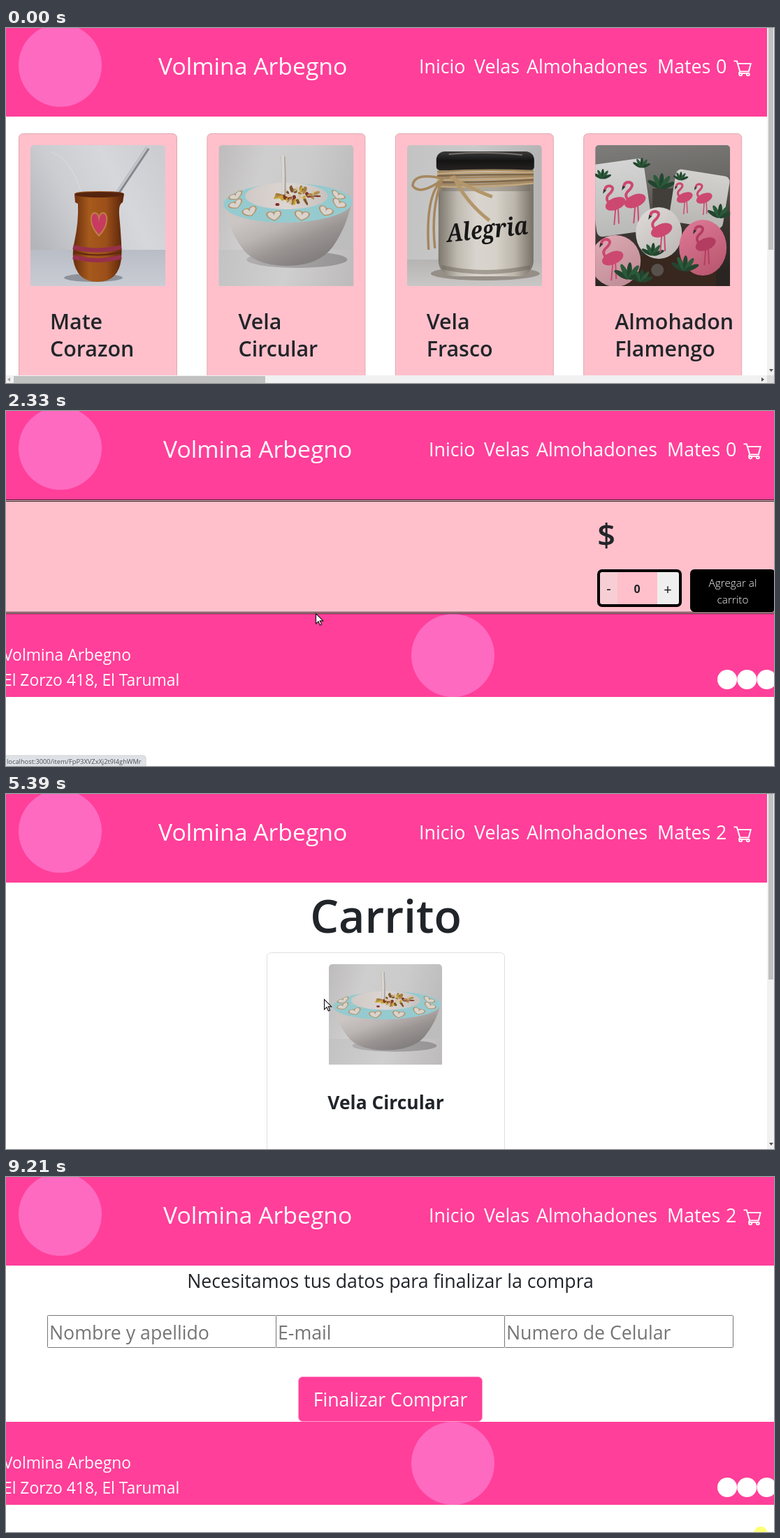
Recreate the animation shown at these times as an HTML page with a canvas. Size 1099 by 509 pixels, loop 9350 ms.

```html
<!DOCTYPE html>
<html lang="es">
<head>
<meta charset="utf-8">
<title>Tienda</title>
<style>
html, body { margin: 0; width: 100%; height: 100%; overflow: hidden; background: #fff; }
canvas { display: block; width: 100vw; height: 100vh; }
</style>
</head>
<body>
<canvas id="stage" width="1099" height="509"></canvas>
<script>
const ctx = document.getElementById('stage').getContext('2d');
const LOOP = 9350, W = 1099, H = 509, BAR = 10;
const HOT = '#ff3f99', LOGO = '#ff6ac1', PINK = '#ffc0cb', INK = '#212529', BUTTON = '#efefef';
const SHOP = 'Volmina Arbegno', ADDRESS = 'El Zorzo 418, El Tarumal';

// ---- drawing helpers
function rect(x, y, w, h, color) { ctx.fillStyle = color; ctx.fillRect(x, y, w, h); }

function box(x, y, w, h, r, fill, stroke, line = 1) {
  ctx.beginPath();
  ctx.roundRect(x, y, w, h, r);
  if (fill) { ctx.fillStyle = fill; ctx.fill(); }
  if (stroke) { ctx.strokeStyle = stroke; ctx.lineWidth = line; ctx.stroke(); }
}

function oval(x, y, rx, ry, fill, angle = 0) {
  ctx.beginPath();
  ctx.ellipse(x, y, rx, ry, angle, 0, Math.PI * 2);
  ctx.fillStyle = fill;
  ctx.fill();
}

function shape(d, fill, stroke, line = 1) {
  const path = new Path2D(d);
  if (fill) { ctx.fillStyle = fill; ctx.fill(path); }
  if (stroke) { ctx.strokeStyle = stroke; ctx.lineWidth = line; ctx.stroke(path); }
}

function text(str, x, y, size, color = INK, weight = 400, align = 'left') {
  ctx.font = `${weight} ${size}px "Open Sans", "Noto Sans", sans-serif`;
  ctx.textAlign = align;
  ctx.fillStyle = color;
  ctx.fillText(str, x, y);
}

function gradient(x0, y0, x1, y1, ...colors) {
  const g = ctx.createLinearGradient(x0, y0, x1, y1);
  colors.forEach((c, i) => g.addColorStop(i / (colors.length - 1), c));
  return g;
}

function at(x, y, draw, sx = 1, sy = sx, angle = 0) {
  ctx.save();
  ctx.translate(x, y);
  ctx.rotate(angle);
  ctx.scale(sx, sy);
  draw();
  ctx.restore();
}

function random(seed) {
  const v = Math.sin(seed * 127.1) * 43758.5;
  return v - Math.floor(v);
}

// Pictures are drawn in a 193 x 202 box and fitted to their place.
function picture(draw, x, y, w, h, r = 0) {
  ctx.save();
  ctx.beginPath();
  ctx.roundRect(x, y, w, h, [r, r, 0, 0]);
  ctx.clip();
  at(x, y, draw, w / 193, h / 202);
  ctx.restore();
}

const HEART = 'M0 14 C-17 0 -13 -15 -5 -13 Q-1 -12 0 -7 Q1 -12 5 -13 C13 -15 17 0 0 14Z';

// ---- pictures
function mate() {
  rect(0, 0, 193, 202, gradient(0, 130, 193, 30, '#b3b5ba', '#cbcdd1', '#d6d7da', '#cccdd1'));
  rect(0, 150, 193, 52, gradient(0, 150, 0, 202, '#b9bdc6', '#c9ccd3'));
  shape('M30 10 Q58 20 72 66', null, '#dcdde0', 1);
  shape('M124 70 L168 4', null, '#85888c', 6);
  shape('M123 69 L167 3', null, '#c4c7ca', 3);
  oval(90, 190, 42, 6, '#8f929b');
  shape('M63 70 Q64 66 98 66 Q133 66 134 70 L132 82 Q126 84 127 100 Q129 120 130 140 Q131 152 130 163 Q126 196 96 196 Q66 196 61 163 Q60 150 63 138 Q69 110 68 84 L64 82Z',
    gradient(60, 0, 132, 0, '#642b0d', '#a65a1c', '#9c5019', '#5c260b'));
  oval(98, 71, 34, 4, '#55240d');
  shape('M61 146 Q96 155 130 146 M61 160 Q96 170 130 160', null, '#98304c', 6);
  shape('M62 153 Q96 162 130 153', null, '#5f270f', 2);
  at(98, 113, () => shape(HEART, '#c83a60', '#bd7d49', 2), 0.95, 1.2);
}

function candle() {
  rect(0, 0, 193, 202, gradient(0, 0, 193, 50, '#bdbbbb', '#cfcece', '#cccbcb', '#bebdbe'));
  rect(0, 150, 193, 52, gradient(0, 150, 193, 202, '#c3c2c3', '#d0cfcf', '#bcbabb'));
  oval(112, 164, 72, 12, gradient(40, 0, 184, 0, '#b0aeaf', '#959394'));
  shape('M7 80 Q12 116 31 144 Q48 172 95 173 Q142 174 163 146 Q184 116 191 78Z',
    gradient(70, 92, 105, 175, '#cbc5c3', '#bbb5b3', '#9a9493', '#858080'));
  oval(99, 83, 92, 28, '#95cacf', -0.02);
  for (let i = 0; i < 8; i++) {
    const a = -0.3 + i * 0.53;
    at(98 + 76 * Math.cos(a), 79 + 23 * Math.sin(a),
      () => shape(HEART, '#d9d3cd', '#b3946c', 2.5), 0.85, 0.36 + 0.12 * Math.sin(a), 0.5 * Math.cos(a));
  }
  oval(97, 73, 59, 19, gradient(38, 0, 156, 0, '#d0c9c6', '#dcd6d3', '#c8c1be'));
  const petals = ['#b28d4e', '#c9a731', '#79552b', '#d5c4a1', '#7d342c', '#a37a3c'];
  for (let i = 0; i < 55; i++) {
    const a = random(i) * 6.28, r = Math.sqrt(random(i + 60));
    oval(113 + 31 * r * Math.cos(a), 73 + 12 * r * Math.sin(a),
      1.5 + 4 * random(i + 120), 1 + 2 * random(i + 180), petals[i % 6], a);
  }
  oval(84, 85, 3, 2, '#84292a');
  shape('M92 16 Q94 42 93 70', null, '#a9a49f', 6);
  shape('M91.5 15 Q93 42 92 70', null, '#d9d5d1', 4);
}

function jar() {
  rect(0, 0, 193, 202, gradient(0, 0, 193, 0, '#c3c3c3', '#cbcaca', '#b5b4b4'));
  rect(0, 164, 193, 38, gradient(0, 164, 0, 202, '#b6b4b2', '#c9c7c5'));
  oval(112, 184, 78, 10, '#958f87');
  box(45, 28, 136, 160, [12, 12, 22, 22],
    gradient(45, 0, 181, 0, '#7d776d', '#bfbab1', '#d9d5ce', '#d6d2ca', '#bcb6ac', '#756f66'));
  rect(50, 40, 126, 26, 'rgba(105,98,88,.4)');
  shape('M50 172 Q112 186 176 172 V178 Q112 192 50 178Z', 'rgba(110,102,92,.5)');
  box(42, 9, 140, 27, [12, 12, 5, 5], gradient(0, 9, 0, 36, '#3c3b3b', '#151414', '#252322'));
  shape('M60 13 Q110 8 165 14', null, '#77706a', 2);
  for (let i = 0; i < 8; i++) {
    shape(`M43 ${38 + i * 3} Q110 ${34 + i * 4} 181 ${37 + i * 2.5}`, null, ['#a5885f', '#c3a77c', '#7f6645'][i % 3], 2.5);
  }
  shape('M52 48 Q10 38 8 58 Q18 73 50 50 Q34 90 40 148 M50 50 Q26 72 31 150', null, '#a5875e', 3.5);
  shape('M66 44 Q84 82 118 108 M62 46 Q100 66 122 74', null, '#b3966b', 5);
  at(58, 139, () => {
    ctx.font = 'italic 700 34px "Noto Serif", serif';
    ctx.textAlign = 'left';
    ctx.fillStyle = '#181717';
    ctx.fillText('Alegria', 0, 0);
  }, 0.91, 1.05, -0.1);
}

function flamingo(x, y, size, color = '#cc4870') {
  at(x, y, () => {
    shape('M0 8 L-2 32 M4 8 L5 30', null, color, 2);
    oval(0, 0, 16, 9, color, -0.4);
    shape('M-8 0 Q-18 -8 -8 -16 Q0 -25 -9 -27 Q-16 -27 -16 -20', null, color, 4);
    shape('M-18 -22 L-19 -15 L-14 -20Z', '#333');
  }, size);
}

function leaves(x, y, size) {
  for (let i = 0; i < 5; i++) {
    const a = -2.6 + i * 0.55;
    oval(x + Math.cos(a) * size, y + Math.sin(a) * size, size, size * 0.3, i % 2 ? '#2b5a39' : '#23452f', a);
  }
}

function cushions() {
  rect(0, 0, 193, 202, gradient(0, 0, 30, 202, '#7d7d7b', '#6b6966', '#3a3430', '#2a2522'));
  rect(28, 158, 145, 44, '#38271e');
  rect(82, 62, 30, 50, '#423e3a');
  leaves(94, 62, 11);
  at(38, 77, () => box(-42, -54, 80, 104, 8, gradient(0, -54, 0, 50, '#d3d4d3', '#b9b9b8')), 1, 1, -0.14);
  at(148, 77, () => box(-38, -38, 78, 76, 8, gradient(0, -38, 0, 38, '#d2d1ce', '#b8b6b3')), 1, 1, 0.16);
  leaves(66, 32, 7); leaves(10, 48, 7); leaves(178, 104, 10); leaves(122, 50, 6);
  flamingo(29, 84, 0.95); flamingo(57, 80, 1);
  flamingo(128, 75, 0.75); flamingo(156, 76, 0.75);
  oval(91, 126, 33, 37, gradient(60, 90, 115, 160, '#dfdcd9', '#bdb8b5')); leaves(82, 158, 9);
  flamingo(95, 122, 1);
  oval(154, 147, 34, 40, gradient(130, 110, 175, 185, '#dc7894', '#b9566f')); flamingo(158, 142, 0.95, '#b23d60');
  oval(29, 166, 36, 37, gradient(0, 130, 50, 202, '#dfaab4', '#bd8c96')); flamingo(25, 162, 1);
  leaves(48, 192, 12); leaves(128, 180, 11); leaves(66, 196, 9);
  oval(89, 179, 9, 9, '#57514c');
}

// ---- page parts
function cartIcon(x) {
  at(x, 46.5, () => {
    shape('M0 1 H4.5 L9 17 H22 L25 5 H6 M9 17 Q6 20 10 20 H22', null, '#fff', 2);
    ctx.strokeStyle = '#fff';
    for (const cx of [10, 21]) { ctx.beginPath(); ctx.arc(cx, 21.5, 2, 0, 7); ctx.stroke(); }
  }, 0.97, 0.93);
}

function header(count, wide) {
  const dx = wide ? 14 : 0;
  rect(0, 0, W, 127, HOT);
  oval(77.5, 53.5, 59.5, 59.5, LOGO);
  text(SHOP, 218 + dx / 2, 67, 33.7, '#fff');
  [['Inicio', 591], ['Velas', 670], ['Almohadones', 745], ['Mates', 932], [count, 1016]]
    .forEach(([label, x]) => text(label, x + dx, 65, 26.8, '#fff'));
  cartIcon(1041.5 + dx);
}

function footer(y, wide) {
  rect(0, y, W, 119, HOT);
  oval(wide ? 639.5 : 633, y + 59.5, 59.5, 59.5, LOGO);
  text(SHOP, -4, y + 67, 22.8, '#fff');
  text(ADDRESS, -4, y + 103, 22.8, '#fff');
  for (let i = 0; i < 3; i++) oval((wide ? 1032 : 1022) + i * 28.3, y + 94, 14, 14, '#fff');
}

function verticalBar(top, bottom, end) {
  rect(W - BAR, 0, BAR, H, '#f1f1f1');
  rect(W - BAR + 2, top, BAR - 3, bottom - top, '#c1c1c1');
  shape(`M1092 ${end - 9} h6 l-3 4Z`, '#505050');
}

function horizontalBar() {
  rect(0, 498, W, 11, '#f1f1f1');
  rect(11, 499, 360, 10, '#c1c1c1');
  shape('M6 501 v6 l-4 -3Z', '#a3a3a3');
  shape('M1081 501 v6 l4 -3Z', '#505050');
  rect(1089, 498, 10, 11, '#dcdcdc');
}

function statusBar(label, width) {
  box(-2, 494, width + 2, 17, [0, 4, 0, 0], '#dee1e6', '#cfd2d6');
  text(label, 1, 506, 9.3, '#4b4e52');
}

const PRODUCTS = [
  [mate, 'Mate', 'Corazon', '$150'], [candle, 'Vela', 'Circular', '$120'],
  [jar, 'Vela', 'Frasco', '$170'], [cushions, 'Almohadon', 'Flamengo', '$250']
];

function home(scroll) {
  at(0, -scroll, () => {
    header(0);
    PRODUCTS.forEach(([draw, first, second, price], i) => {
      const x = 18 + i * 269.4;
      box(x + .5, 151.5, 226, 482, 6, PINK, '#dfa8b2');
      picture(draw, x + 17, 168, 193, 202, 5);
      text(first, x + 45, 431.5, 30.4, INK, 600);
      text(second, x + 45, 470.5, 30.4, INK, 600);
      text(price, x + 45.5, 524, 26.7);
      box(x + 46.5, 535, 129, 53, 8, BUTTON, '#fff', 3);
      text('ver detalles', x + 111, 570, 19, '#000', 400, 'center');
    });
    footer(646);
  });
  verticalBar(scroll * .62 - 7, scroll * .62 + 318, 498);
  horizontalBar();
}

function doubleBorder(y, h, right) {
  ctx.strokeStyle = '#2a1d20';
  ctx.lineWidth = 1;
  ctx.strokeRect(-5, y + .5, right + 4.5, h - 1);
  ctx.strokeRect(-5, y + 2.5, right + 2.5, h - 5);
}

function buyControls(x, y, quantity, added) {
  rect(x + 4, y + 4, 25, 46, quantity ? BUTTON : '#f6ced4');
  rect(x + 86, y + 4, 32, 46, BUTTON);
  box(x + 2, y + 2, 117, 50, 5, null, '#000', 4);
  text('-', x + 16.5, y + 35, 20, '#111', 400, 'center');
  text(quantity, x + 57, y + 34, 16, INK, 700, 'center');
  text('+', x + 101, y + 36, 20, '#111', 400, 'center');
  box(x + 133, y, 122, 61, 6, '#000');
  text(added ? 'Terminar' : 'Agregar al', x + 194, y + 25, 15.3, '#fff', 300, 'center');
  text(added ? 'compra' : 'carrito', x + 194, y + 49, 15.3, '#fff', 300, 'center');
}

function emptyItem() {
  header(0, true);
  rect(0, 127, W, 164, PINK);
  doubleBorder(127, 164, W + 9);
  text('$', 846, 194, 46, INK, 600);
  buyControls(846, 227, 0);
  footer(291, true);
}

function item(t) {
  const added = t >= 4480;
  header(added ? 2 : 0);
  rect(0, 127, W, 367, PINK);
  picture(candle, 0, 130, 404, 362);
  doubleBorder(127, 367, W - BAR);
  text('Vela Circular', 769, 187, 52.4, INK, 600);
  text('$120', 768, 262, 45.2, INK, 600);
  buyControls(769, 295, t < 3830 ? 0 : t < 3960 ? 1 : 2, added);
  footer(494);
  verticalBar(-7, 417, 509);
}

function cart(scroll) {
  at(0, -scroll, () => {
    header(2);
    text('Carrito', 543.5, 199, 64.5, INK, 600, 'center');
    box(373.5, 227.5, 340, 464, 6, '#fff', '#dfdfdf');
    picture(candle, 462, 244, 162, 144, 5);
    text('Vela Circular', 543.5, 452, 26.4, INK, 700, 'center');
    text('Cantidad: 2', 543, 540, 26.7, INK, 400, 'center');
    text('Precio: $240', 543, 584, 26.7, INK, 400, 'center');
    box(473, 614, 140, 54, 6, HOT);
    text('Eliminar', 543, 650, 24, '#fff', 400, 'center');
    text('Total: $240', 543, 735, 30, INK, 600, 'center');
    box(418, 757, 250, 62, 6, HOT);
    text('Finalizar compra', 543, 797, 26.7, '#fff', 400, 'center');
    footer(826);
  });
  verticalBar(scroll * .54 - 7, scroll * .54 + 266, 509);
}

function checkout() {
  header(2, true);
  text('Necesitamos tus datos para finalizar la compra', 550, 159, 26.7, INK, 400, 'center');
  ['Nombre y apellido', 'E-mail', 'Numero de Celular'].forEach((label, i) => {
    const x = 59.5 + i * 327;
    box(x, 198.5, 327, 46, 1, '#fff', '#767676');
    text(label, x + 2.5, 233, 26.7, '#757575');
  });
  footer(351, true);
  box(418.5, 286.5, 263, 64, 6, HOT, '#ff9ccb');
  text('Finalizar Comprar', 550, 329, 26.7, '#fff', 400, 'center');
}

// ---- motion
const POINTER = [
  [260, 1075, 470], [800, 541, 222], [1510, 541, 222], [1900, 443, 290], [2530, 443, 290],
  [3340, 869, 333], [4160, 869, 333], [4400, 930, 330], [5040, 935, 345], [5360, 455, 294],
  [5590, 455, 294], [6400, 560, 498], [7570, 560, 498], [8440, 549, 305], [8740, 690, 420]
];
const HOME_SCROLL = [[850, 0], [1170, 176], [1310, 267]];
const CART_SCROLL = [[5590, 0], [6150, 280]];
const HAND = [[1900, 2260], [3300, 5040], [6430, 7200], [8300, 8600]];
const CLICK = [[2130, 2260], [3500, 3960], [4440, 4580], [4900, 5000], [6760, 6900]];

const during = (spans, t) => spans.some(([from, to]) => t >= from && t < to);
const linear = k => k;
const smooth = k => k * k * (3 - 2 * k);

function follow(keys, t, ease = linear) {
  const next = keys.findIndex(key => key[0] > t);
  if (next < 0) return keys[keys.length - 1].slice(1);
  if (next === 0) return keys[0].slice(1);
  const a = keys[next - 1], b = keys[next];
  const k = ease((t - a[0]) / (b[0] - a[0]));
  return a.slice(1).map((v, i) => v + (b[i + 1] - v) * k);
}

function pointer(t, step) {
  if (t < 260 || t >= 8750) return;
  const [x, y] = follow(POINTER, step, smooth);
  at(x, y, () => {
    if (during(CLICK, t)) oval(1, 12, 9, 9, 'rgba(130,130,130,.45)');
    if (during(HAND, t)) {
      shape('M-2.5 1.5 Q-1 -.5 .5 1.5 V7 Q2.5 5.5 3.8 8 Q6 6.5 7 9 Q10 8 10 11 V14 Q9 17 8 19 H0 L-5 12 Q-6 9 -2.5 11Z', '#fff', '#111', 1.2);
      shape('M.5 7 V11 M3.8 8 V11 M7 9 V12', null, '#111');
    } else {
      shape('M.5 .5 V15 L4 11.7 L6.3 17 L8.6 16 L6.3 10.9 H10.8Z', '#fff', '#111', 1.1);
    }
  });
}

function render(t) {
  const step = t < 260 ? 0 : 260 + Math.floor((t - 260) / 70) * 70;
  rect(0, 0, W, H, '#fff');
  if (t < 2260) home(follow(HOME_SCROLL, step)[0]);
  else if (t < 2530) emptyItem();
  else if (t < 5000) item(t);
  else if (t < 7200) cart(follow(CART_SCROLL, step)[0]);
  else checkout();

  if (during([[1900, 2530]], t)) statusBar('localhost:3000/item/FpP3XVZxXj2t9I4ghWMr', 200);
  if (during([[4580, 5110]], t)) statusBar('localhost:3000/cart', 90);
  if (during([[6400, 7570]], t)) statusBar('localhost:3000/Checkout', 112);
  pointer(t, step);
  if (t >= 9210) oval(1080, 510, 9.5, 9, '#ffff72');
}

const start = performance.now();
function frame() {
  render((performance.now() - start) % LOOP);
  requestAnimationFrame(frame);
}
frame();
</script>
</body>
</html>
```
